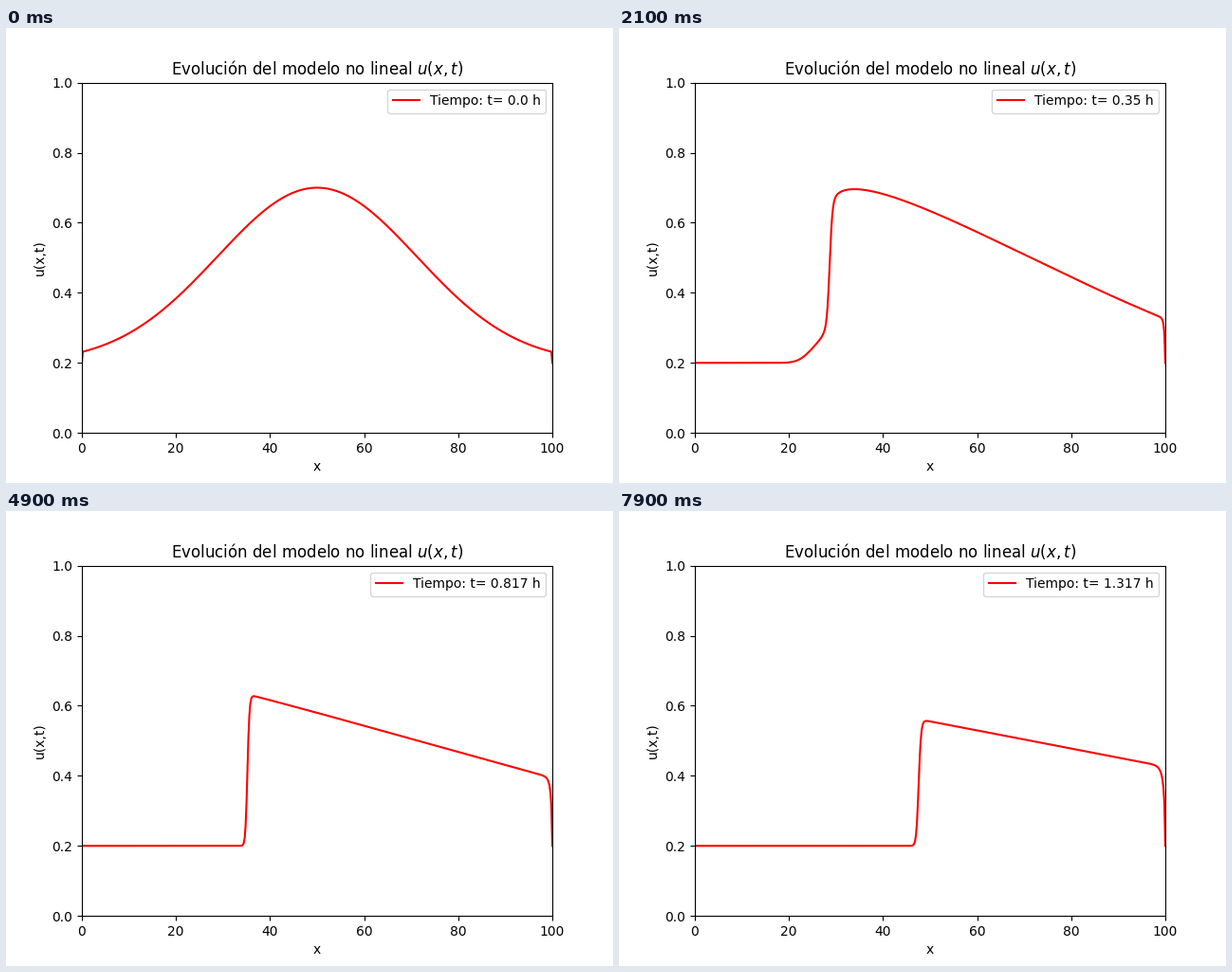
Write a matplotlib script that moves like this. It is 640 px wide and 480 px high and loops after 8 s.

```python
import numpy as np
import matplotlib.pyplot as plt
from matplotlib.animation import FuncAnimation

FRAMES = 80
PER_HOUR = 60      # frames per simulated hour
SUBSTEPS = 100
SPEED = 120.0      # free flow speed
DIFFUSION = 11.0
BASE = 0.2         # density held at both ends

x = np.linspace(0, 100, 501)
dx = x[1] - x[0]
dt = 1 / (PER_HOUR * SUBSTEPS)


def step(u):
    """Advance u_t + (V u (1 - u))_x = D u_xx by dt."""
    flux = SPEED * u * (1 - u)
    new = u.copy()
    new[1:-1] += dt * (
        DIFFUSION * (u[2:] - 2 * u[1:-1] + u[:-2]) / dx**2
        - (flux[2:] - flux[:-2]) / (2 * dx)
    )
    return new


def solve():
    u = BASE + 0.5 * np.exp(-((x - 50) / 30) ** 2)
    u[0] = u[-1] = BASE
    states = [u]
    for _ in range(FRAMES - 1):
        for _ in range(SUBSTEPS):
            u = step(u)
        states.append(u)
    return states


def label(k):
    return f"Tiempo: t= {round(k / PER_HOUR, 3)} h"


states = solve()

fig, ax = plt.subplots(figsize=(6.4, 4.8), dpi=100)
line, = ax.plot(x, states[0], color="red", label=label(0))
ax.set(xlim=(0, 100), ylim=(0, 1), xlabel="x", ylabel="u(x,t)")
ax.set_title("Evolución del modelo no lineal $u(x,t)$")
legend_text = ax.legend(loc="upper right").get_texts()[0]


def update(k):
    line.set_ydata(states[k])
    legend_text.set_text(label(k))
    return line, legend_text


anim = FuncAnimation(fig, update, frames=FRAMES, interval=100,
                     repeat=True, repeat_delay=0)
plt.show()
```
